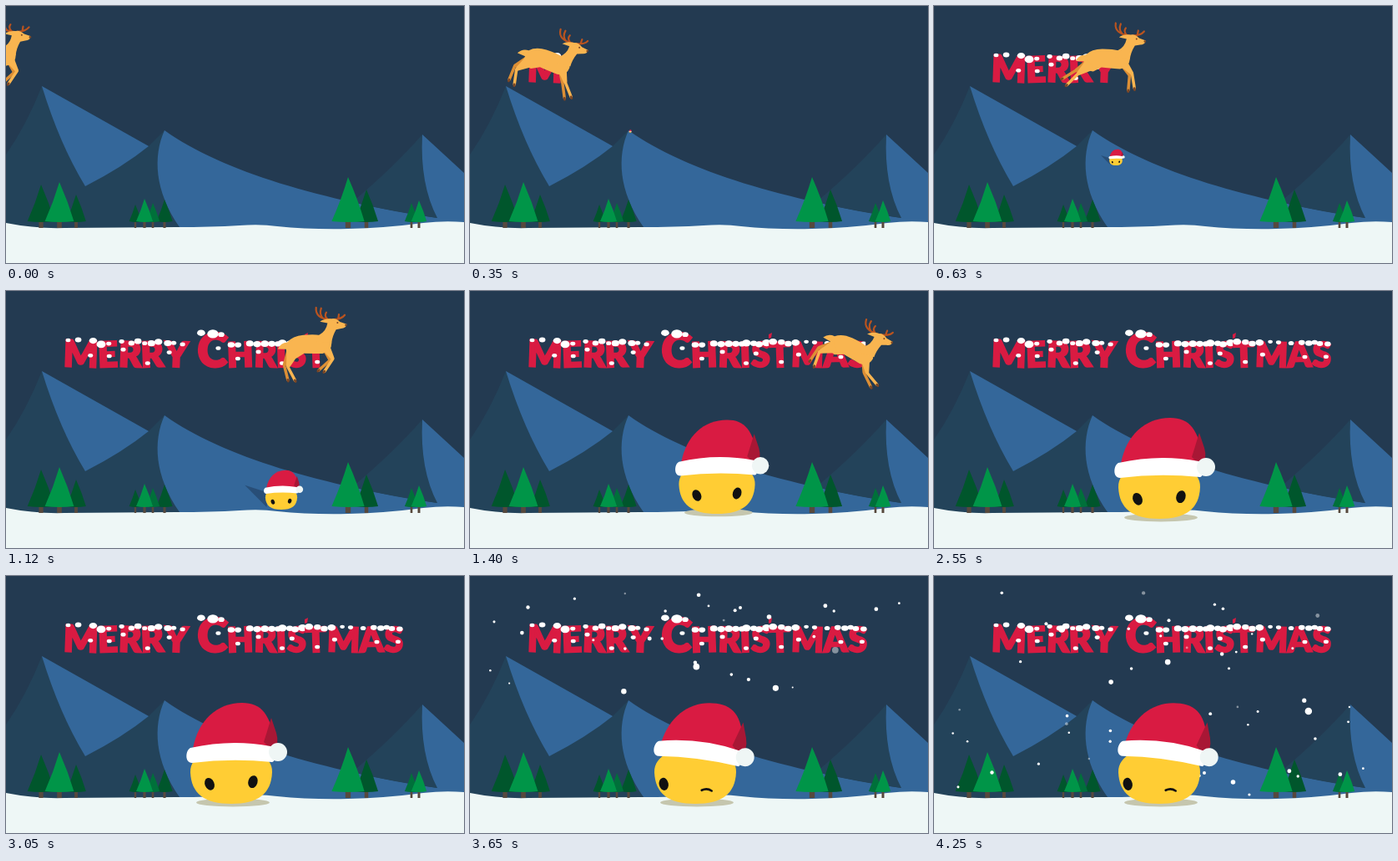
Animation of 549 by 308 pixels, one loop 6.25 s. Source, as an HTML page with a canvas:

```html
<!DOCTYPE html>
<html lang="en">
<head>
<meta charset="utf-8">
<title>Merry Christmas</title>
<style>
html, body { margin: 0; width: 100%; height: 100%; overflow: hidden; background: #233a51; }
canvas { display: block; }
</style>
</head>
<body>
<canvas width="549" height="308"></canvas>
<script>
const c = document.querySelector('canvas').getContext('2d');
const LOOP = 6250, TAU = Math.PI * 2, RAD = Math.PI / 180;
const RED = '#d91b42', BLUE = '#34679a', SLOPE = '#23435a', SNOW = '#eef7f6';
const GOLD = '#f9b550', AMBER = '#dd8f35', RUST = '#b9531f', HOOF = '#7a4626';

const fill = (color, d) => { c.fillStyle = color; c.fill(new Path2D(d)); };
const stroke = (color, width, d) => {
  c.strokeStyle = color;
  c.lineWidth = width;
  c.stroke(new Path2D(d));
};
const oval = (color, x, y, rx, ry = rx, turn = 0) => {
  c.fillStyle = color;
  c.beginPath();
  c.ellipse(x, y, rx, ry, turn * RAD, 0, TAU);
  c.fill();
};
const group = draw => { c.save(); draw(); c.restore(); };

function seeded(n) {
  return () => (n = n * 16807 % 2147483647) / 2147483647;
}

// keys: [time, ...values]
function track(keys, t) {
  let i = 0;
  while (i < keys.length - 2 && t >= keys[i + 1][0]) i++;
  const [a, b] = [keys[i], keys[i + 1]];
  const k = Math.min(1, Math.max(0, (t - a[0]) / (b[0] - a[0])));
  return a.map((v, j) => v + (b[j] - v) * k).slice(1);
}

/* ---------- landscape ---------- */
const GREEN = '#009548', MID = '#00703a', DARK = '#00562c';
// x, top, color
const TREES = [
  [42, 214, DARK], [84, 226, DARK], [64, 211, GREEN],
  [155, 238, DARK], [190, 232, DARK], [176, 236, MID], [166, 231, GREEN],
  [432, 220, DARK], [410, 205, GREEN], [486, 236, MID], [495, 233, GREEN]
];

function tree([x, top, color]) {
  const base = 258, tall = base - top, w = tall * .37, r = tall * .06;
  fill('#57493d', `M${x - r} ${base - 2}h${2 * r}v10h${-2 * r}Z`);
  fill(color, `M${x} ${top}Q${x + w * .6} ${base - tall / 2} ${x + w} ${base}Q${x} ${base + 2} ${x - w} ${base}Q${x - w * .4} ${base - tall / 2} ${x} ${top}Z`);
}

function landscape() {
  fill('#233a51', 'M0 0H549V308H0Z');
  fill(SLOPE, 'M0 178Q25 142 43 96L171 168L190 149L208 270H0Z');
  fill(BLUE, 'M43 96L171 168Q140 193 95 216Q64 165 43 96Z');
  fill(BLUE, 'M190 149C260 199 380 233 517 254L549 262V275H212L208 265C178 222 176 180 190 149Z');
  fill(SLOPE, 'M499 154Q465 193 415 235Q465 247 517 254Q497 205 499 154Z');
  fill(BLUE, 'M499 154L549 200V275H510L517 254Q496 214 499 154Z');
  fill(SNOW, 'M0 260Q35 267 70 266L205 265Q245 265 280 263Q305 261 325 264Q365 268 410 267Q455 266 500 260Q525 257 549 259V308H0Z');
  TREES.forEach(tree);
}

/* ---------- greeting ---------- */
function letter(ch, x, y, size, tilt, rnd) {
  const w = c.measureText(ch).width;
  group(() => {
    c.translate(x + w / 2, y);
    c.rotate(tilt * RAD);
    c.fillStyle = c.strokeStyle = RED;
    c.lineWidth = 2;
    c.fillText(ch, 0, 0);
    c.strokeText(ch, 0, 0);
  });
  const top = y - size * .74;
  for (let at = .15; at < .9; at += .25 + rnd() * .2) {
    const r = size * (.06 + rnd() * .06);
    oval('#fff', x + w * at, top + rnd() * 4, r * 1.1, r * .85);
  }
  oval('#fff', x + w * (.2 + rnd() * .6), y - size * (.1 + rnd() * .4), 3, 2.3);
  return w;
}

function word(text, center, size, capital, rnd) {
  const sizes = [...text].map((_, i) => i ? size : capital);
  const font = s => { c.font = `900 ${s}px Lato, sans-serif`; };
  let total = 0;
  [...text].forEach((ch, i) => { font(sizes[i]); total += c.measureText(ch).width; });
  let x = center - total / 2;
  [...text].forEach((ch, i) => {
    font(sizes[i]);
    x += letter(ch, x, 91, sizes[i], i % 2 ? -2 : 2, rnd);
  });
}

function greeting(edge) {
  c.beginPath();
  c.rect(0, 0, edge, 130);
  c.clip();
  c.textAlign = 'center';
  const rnd = seeded(77);
  word('MERRY', 143, 42, 44, rnd);
  word('CHRISTMAS', 352, 41, 56, rnd);
  fill(RED, 'M358 52L362 50L361 56L358 57Z');
}

/* ---------- reindeer ---------- */
const STRIDE = 560;
// phase, body turn, then thigh and shin angles (0 is down, positive is back) of hind and fore legs
const GAIT = [
  [0, -5, 18, -28, -32, 34], [.125, 0, 52, 45, -40, -9],
  [.5, 25, 72, 20, -8, -40], [1, -5, 18, -28, -32, 34]
];
const deerX = t => .338 * t - 16 + 14 * Math.sin(TAU * t / STRIDE);
const deerY = t => 64 + .003 * t - 2 * Math.cos(TAU * t / STRIDE);

function leg(color, x, y, thigh, shin, long, wide) {
  const kx = x - long * Math.sin(thigh * RAD), ky = y + long * Math.cos(thigh * RAD);
  const dx = -18 * Math.sin(shin * RAD), dy = 18 * Math.cos(shin * RAD);
  const nx = Math.cos(thigh * RAD), ny = Math.sin(thigh * RAD);
  fill(color, `M${x - wide * nx} ${y - wide * ny}L${kx - 2 * nx} ${ky - 2 * ny}L${kx + 2 * nx} ${ky + 2 * ny}L${x + wide * nx} ${y + wide * ny}Z`);
  stroke(color, 3.5, `M${kx} ${ky}l${dx} ${dy}`);
  stroke(HOOF, 2.8, `M${kx + dx} ${ky + dy}l${dx * .1} ${dy * .1}`);
}

function reindeer(t) {
  const [turn, hindThigh, hindShin, foreThigh, foreShin] = track(GAIT, t % STRIDE / STRIDE);
  const legs = (color, lag) => {
    leg(color, -19, 5, hindThigh - turn + lag, hindShin - turn + lag, 20, 8);
    leg(color, 21, 5, foreThigh - turn + lag, foreShin - turn + lag, 15, 5);
  };
  c.translate(deerX(t), deerY(t));
  c.rotate(turn * RAD);
  c.lineCap = c.lineJoin = 'round';
  legs(AMBER, 14);
  fill(GOLD, 'M28 -1Q27 10 16 11Q3 10 -6 9L-16 14Q-28 12 -27 2L-37 1Q-33 -6 -25 -6Q-18 -13 -5 -13Q8 -13 15 -11L24 -12Z');
  legs(GOLD, 0);
  c.translate(20, -4);
  c.rotate(-.6 * turn * RAD);
  c.translate(-20, 4);
  stroke(RUST, 2.2, 'M28 -29Q9 -31 11 -44M19 -31Q14 -36 17 -43M24 -30Q20 -34 23 -38M31 -29Q41 -29 45 -34M37 -30L38 -35');
  fill(GOLD, 'M47 -23Q46 -18 40 -18L34 -17Q29 -9 28 -1L10 -3L13 -11Q22 -15 24 -25L15 -27Q20 -31 29 -30Q34 -31 39 -26Z');
  oval(HOOF, 36, -25, 1);
  oval(HOOF, 46, -22, 1.3);
}

/* ---------- chick in a hat ---------- */
// time, x, bottom, scale
const SLIDE = [[350, 192, 152, .03], [630, 218, 191, .16], [1120, 330, 262, .39],
  [1260, 328, 265, .66], [1400, 296, 267, .93], [1750, 270, 273, 1]];
// start, tilt, eyes: o open, - closed
const MOODS = [
  [0, 0, 'oo'], [1540, -14, 'oo'], [1950, -14, '--'], [2150, 14, 'oo'], [2350, 14, '--'],
  [2550, 0, 'oo'], [2650, -8, 'oo'], [2750, -8, '-o'], [3050, 0, 'oo'], [3150, 8, 'o-']
];

function eye(x, look, lean) {
  if (look === 'o') return oval('#111', x, 0, 5.6, 7.6, lean);
  c.lineCap = 'round';
  stroke('#111', 2.6, `M${x - 6} 1Q${x} -3 ${x + 6} 0`);
}

// drawn with the feet at 0,0
function chick(t) {
  const [x, y, s] = track(SLIDE, t);
  const [, tilt, eyes] = MOODS.findLast(m => m[0] <= t);
  const steep = Math.abs(tilt) > 10;
  c.translate(x, y);
  c.scale(s, s);
  if (s < .6) fill('rgba(33,62,96,.6)', 'M-112 -75L-40 -52L-45 -8Z');
  if (t > 1250) oval('#c5c6ae', 2, -1.5, 44, 5);
  fill('#ffcd34', 'M-49 -38C-50 -78 50 -78 49 -38C48 -12 32 0 0 0C-32 0 -48 -12 -49 -38Z');
  group(() => {
    c.translate(-12 * Math.sign(tilt), steep ? -45 : tilt ? -20 : -25);
    c.rotate((tilt || -3) * RAD);
    eye(-26, eyes[0], -20);
    eye(26, eyes[1], 20);
  });
  c.translate(tilt * .5, -60 - Math.abs(tilt) * .2);
  c.rotate(tilt * RAD);
  if (t < 2150 && steep) c.scale(-1, 1);
  fill(RED, 'M-46 -6C-40 -40 -17 -61 13 -61C36 -61 47 -48 53 -10L48 2H-44Z');
  fill('#a81735', 'M48 -43L39 -14L51 -2Q58 -12 54 -25Z');
  fill('#fff', 'M-49 -7Q0 -18 47 -9C53 -7 54 10 49 10Q0 5 -47 11C-56 11 -55 -4 -49 -7Z');
  oval('#eff6f5', 56, -2, 11);
}

/* ---------- snowfall ---------- */
function snowfall(t) {
  const step = Math.min(4, Math.floor((t - 3450) / 200));
  const drop = 66 * (step - 4), rnd = seeded(4021);
  for (let i = 0; i < 72; i++) {
    const x = 8 + rnd() * 518, y = 8 + rnd() * 332 + drop;
    const r = 1 + rnd() + 3 * rnd() ** 6, dim = rnd() < .17;
    if (y > 5 && y < 263) oval(dim ? 'rgba(255,255,255,.45)' : '#fff', x, y, r);
  }
}

function draw(now) {
  const time = now % LOOP;
  const t = time < 1950 ? Math.min(1750, Math.floor(time / 70) * 70) : time;
  landscape();
  group(() => greeting(t < 1750 ? deerX(t) + 17 : 549));
  if (t < 1950) group(() => reindeer(t));
  if (t >= 3450) snowfall(t);
  if (t >= 350) group(() => chick(t));
}

const start = performance.now();
function tick() {
  draw(performance.now() - start);
  requestAnimationFrame(tick);
}
tick();
</script>
</body>
</html>
```
